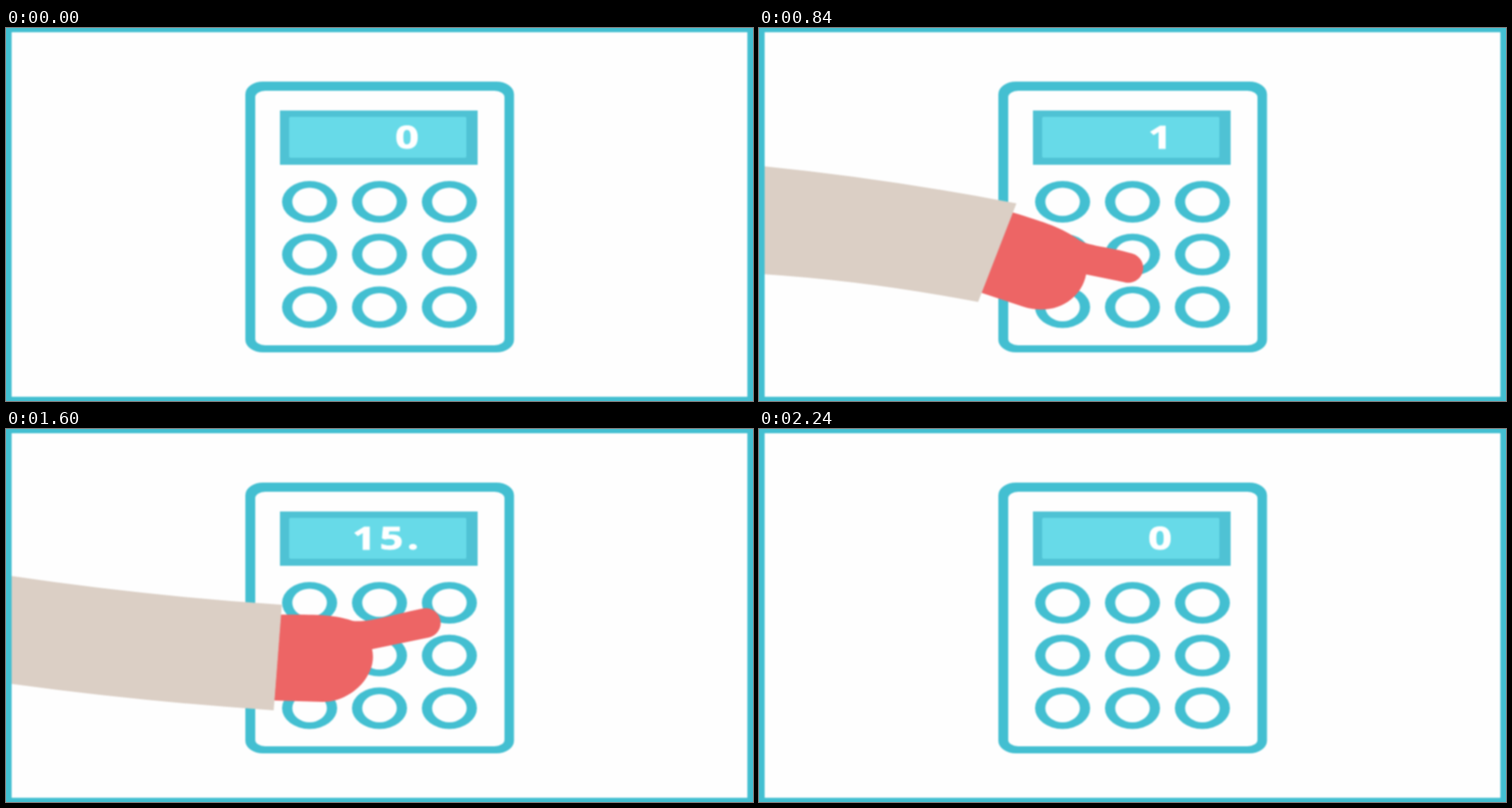
Recreate the animation shown at these times as an HTML page. Size 1058 px wide and 529 px high, loop 5 s.

```html
<!DOCTYPE html>
<html lang="en">
<head>
<meta charset="utf-8">
<title>Calculator</title>
<style>
  html, body { margin: 0; width: 100%; height: 100%; overflow: hidden; background: #fefefe; }
  svg { display: block; width: 100%; height: 100%; }
  #scene { filter: blur(1.3px); }
  text {
    font: 700 44px "Open Sans", "Noto Sans", sans-serif; letter-spacing: 4px; text-anchor: end;
    fill: #fff; stroke: #fff; stroke-width: .9px;
  }
</style>
</head>
<body>
<svg viewBox="0 0 1058 529">
  <g id="scene">
    <rect x="-20" y="-20" width="1098" height="569" fill="#fefefe"/>
    <g fill="#43bfd1" fill-rule="evenodd">
      <path id="body"/>
      <path id="keys"/>
    </g>
    <rect x="388" y="117" width="280" height="77" fill="#4fc2d4"/>
    <rect x="401" y="126" width="251" height="58" rx="2" fill="#67dae8"/>
    <text id="digits" transform="translate(590 171) scale(1.33 1)">0</text>
    <g id="arm">
      <path id="hand" fill="#ed6565"/>
      <path id="sleeve" fill="#dbcfc5"/>
    </g>
    <path fill="#43bfd1" fill-rule="evenodd" d="M-20 -20H1078V549H-20ZM8 6V523H1050V6Z"/>
  </g>
</svg>
<script>
const LOOP = 5000, STEP = 40, END = 2240;
const REACHED = 280, FIRST = 360;              // arm stretched out, first key touched
const CYCLE = 440, PRESS = 120, MOVE = 240;    // touch, press, rest, move on
const RAD = Math.PI / 180, FINGER = 21;

const el = id => document.getElementById(id);
const set = (id, d) => el(id).setAttribute('d', d);
const clamp = k => Math.max(0, Math.min(1, k));
const mix = (a, b, k) => a.map((v, i) => v + (b[i] - v) * k);
const easeInOut = k => k < .5 ? 2 * k * k : 1 - 2 * (1 - k) ** 2;

function turned(x, y, deg) {
  const c = Math.cos(deg * RAD), s = Math.sin(deg * RAD);
  return [x * c - y * s, x * s + y * c];
}

const ellipse = (x, y, rx, ry) =>
  `M${x - rx} ${y}a${rx} ${ry} 0 1 0 ${2 * rx} 0a${rx} ${ry} 0 1 0 ${-2 * rx} 0Z`;

const roundRect = (x1, y1, x2, y2, rx, ry) =>
  `M${x1 + rx} ${y1}H${x2 - rx}a${rx} ${ry} 0 0 1 ${rx} ${ry}V${y2 - ry}` +
  `a${rx} ${ry} 0 0 1 ${-rx} ${ry}H${x1 + rx}a${rx} ${ry} 0 0 1 ${-rx} ${-ry}V${y1 + ry}` +
  `a${rx} ${ry} 0 0 1 ${rx} ${-ry}Z`;

set('body', roundRect(339, 76, 719.5, 460, 25, 18) + roundRect(353, 89, 706, 450, 14, 9));

let rings = '';
for (let i = 0; i < 9; i++) {
  const x = 430 + 99 * (i % 3), y = 246.5 + 74.7 * Math.floor(i / 3);
  rings += ellipse(x, y, 39, 29.5) + ellipse(x, y, 24.5, 20);
}
set('keys', rings);

// Pose: fingertip x, fingertip y, wrist turn, finger stretch, sleeve y at the left edge
const away = [-59, 244, 0, 0, 192];
const reach = [361, 244, 0, 0, 192];
const touches = [
  [441, 241, 7.4, .25, 172],
  [518, 329, 19.3, .45, 191],
  [436, 391, 11.3, .45, 291],
  [640, 242, 0, 1, 185]
];
const gone = [-110, 330, 6, .45, 265];

function poseAt(t) {
  if (t < REACHED) return mix(away, reach, t / REACHED);
  if (t < FIRST) return mix(reach, touches[0], (t - REACHED) / (FIRST - REACHED));
  const last = touches.length - 1;
  const n = Math.min(last, Math.floor((t - FIRST) / CYCLE));
  const u = t - FIRST - n * CYCLE;
  if (u < PRESS) {
    const dip = Math.sin(Math.PI * u / PRESS);
    const [x, y, turn, stretch, edge] = touches[n];
    return [x + 6 * dip, y + 13 * dip, turn, stretch, edge + 6 * dip];
  }
  if (n === last) return mix(touches[n], gone, clamp((u - PRESS) / CYCLE) ** 2);
  return mix(touches[n], touches[n + 1], easeInOut(clamp((u - CYCLE + MOVE) / MOVE)));
}

function drawArm([x, y, turn, stretch, edge]) {
  // Hand, measured from the upper corner of the cuff
  const tx = 171 + 44 * stretch ** 2, ty = 52 - 40 * stretch;
  const [ux, uy] = turned(1, 0, 1 - 19 * stretch ** 2);
  const nx = 125 + 7 * stretch ** 2, ny = 57 + 18 * (1 - stretch) ** 2;
  const knuckle = 18 + 9 * (1 - stretch) ** 3;
  const topX = tx + FINGER * uy, topY = ty - FINGER * ux;
  const [ox, oy] = turned(tx, ty, turn);
  const cx = x - ox, cy = y - oy;

  set('hand', `M-1 14C48 12 72 ${knuckle - 8} 100 ${knuckle}` +
    `C118 ${knuckle + 4} ${topX - 40 * ux} ${topY - 40 * uy} ${topX} ${topY}` +
    `A${FINGER} ${FINGER} 0 0 1 ${tx - FINGER * uy} ${ty + FINGER * ux}L${nx} ${ny}` +
    `C${nx + 12 * stretch} ${ny + 36} 104 134 ${50 + 15 * stretch} 135L-5 136Z`);
  el('hand').setAttribute('transform', `translate(${cx} ${cy}) rotate(${turn})`);

  const [dx, dy] = turned(-5, 150, turn);
  const bx = cx + dx, by = cy + dy;
  const slope = .0088 * turn + .05 * stretch;
  set('sleeve', `M8 ${edge}Q${cx / 2} ${cy - slope * cx / 2} ${cx} ${cy}` +
    `L${bx} ${by}Q${bx / 2} ${by - slope * bx / 2} 8 ${edge + 153}Z`);
}

function draw(now) {
  const t = Math.floor(now % LOOP / STEP) * STEP;
  const visible = t > 0 && t < END;
  el('arm').style.display = visible ? '' : 'none';
  if (visible) drawArm(poseAt(t));
  el('digits').textContent = visible && '15.9'.slice(0, Math.floor(t / CYCLE)) || '0';
}

let start;
function tick(now) {
  start ??= now;
  draw(now - start);
  requestAnimationFrame(tick);
}
draw(0);
requestAnimationFrame(tick);
</script>
</body>
</html>
```
